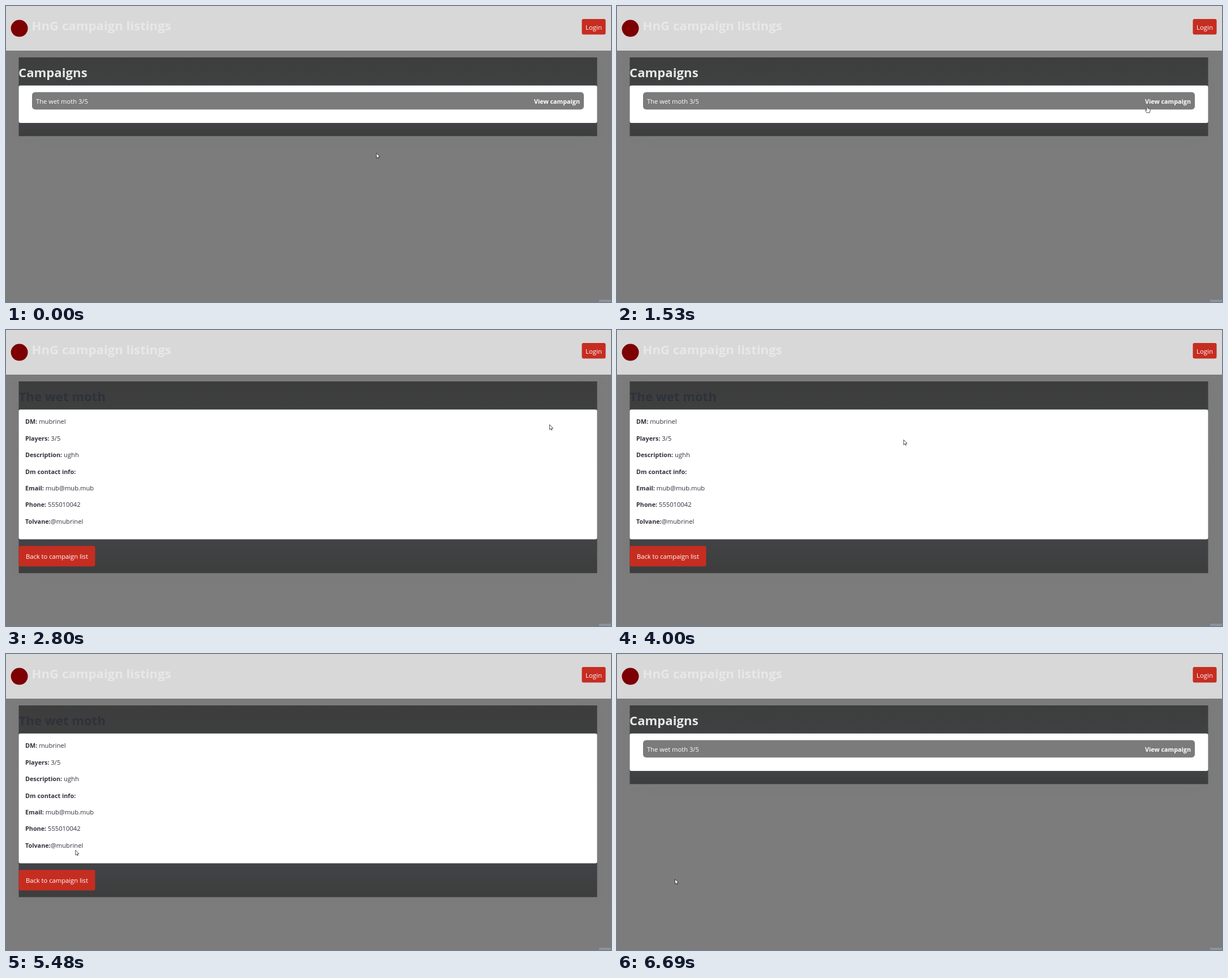
Animation, 1069 px wide and 524 px high, one loop 7.28 s. Source, as an HTML page:

```html
<!DOCTYPE html>
<html lang="en">
<head>
<meta charset="utf-8">
<title>Campaign listings</title>
<style>
  html, body { margin: 0; width: 100%; height: 100%; overflow: hidden; background: #7c7c7c; }
  svg { display: block; width: 1069px; height: 524px; }
  text { font: 11.2px "Open Sans", "Noto Sans", sans-serif; fill: #fff; white-space: pre; }
  .bold { font-weight: 700; font-size: 10.8px; }
  .heading { font-weight: 700; font-size: 22.2px; fill: #e8e8e8; }
  .dark, .rows text { fill: #2f313c; }
  .panel { fill: url(#shade); }
  .glow { fill: #727478; opacity: .3; filter: url(#blur); }
  .red { fill: #c62d21; }
  .red.pressed { fill: #b0281e; stroke: #b0281e; }
  .cursor { fill: #fff; stroke: #222; stroke-width: .8; stroke-linejoin: round; }
</style>
</head>
<body>
<svg viewBox="0 0 1069 524">
  <defs>
    <linearGradient id="shade" x2="0" y2="1">
      <stop offset="0" stop-color="#3c3d3c"/>
      <stop offset=".65" stop-color="#434447"/>
      <stop offset=".83" stop-color="#424346"/>
      <stop offset="1" stop-color="#3c3d3c"/>
    </linearGradient>
    <filter id="blur" x="-20%" y="-50%" width="140%" height="200%">
      <feGaussianBlur stdDeviation="16"/>
    </filter>
  </defs>
  <rect width="1069" height="524" fill="#7c7c7c"/>

  <g id="list">
    <rect class="glow" x="22.5" y="91" width="1022" height="139"/>
    <rect class="panel" x="22.5" y="91" width="1022" height="139.3"/>
    <text class="heading" x="22" y="125.5">Campaigns</text>
    <rect x="22.5" y="140.7" width="1022" height="66.3" rx="3" fill="#fff"/>
    <rect x="46" y="152.4" width="975" height="30.8" rx="5.5" fill="#7b7b7b"/>
    <text x="53" y="172.7">The wet moth 3/5</text>
    <text class="bold" x="1014" y="172.7" text-anchor="end">View campaign</text>
  </g>

  <g id="detail">
    <rect class="glow" x="22.5" y="91" width="1022" height="339"/>
    <rect class="panel" x="22.5" y="91" width="1022" height="339.4"/>
    <text class="heading dark" x="22.5" y="125.5">The wet moth</text>
    <rect x="22.5" y="140.7" width="1022" height="229.8" rx="3" fill="#fff"/>
    <g class="rows" id="rows"></g>
    <rect class="red" id="back" x="22.5" y="382.2" width="135" height="36.3" rx="3"/>
    <text x="35" y="405.2">Back to campaign list</text>
  </g>

  <rect width="1069" height="79" fill="#d8d8d8"/>
  <circle cx="23.6" cy="39.6" r="15" fill="#7d0003"/>
  <text class="heading" x="45.5" y="43">HnG campaign listings</text>
  <rect class="red" x="1017.5" y="23" width="42" height="27.5" rx="3"/>
  <text x="1024" y="42" style="font-size:11.4px">Login</text>
  <rect x="1048" y="520" width="21" height="4" fill="#8b939e"/>

  <g class="cursor" id="cursor">
    <path id="arrow" d="M.5 .5V9.4L2.5 7.5 3.8 10.3 5.1 9.7 3.9 7H6.6Z"/>
    <path id="hand" d="M-.9 .9Q0-.5 .9 .9V4.4Q2-.2+3.7 2.5 4.4Q3.6 4 4 5Q5 4.7 5.2 5.8V8.4L4.2 11.6H-.9L-3.4 7.8Q-3.4 6.2-2 6.8L-.9 7.8Z"/>
  </g>
</svg>
<script>
const LOOP = 7280, STEP = 67, FIRST_STEP = 520;
const el = id => document.getElementById(id);
const show = (id, on) => { el(id).style.display = on ? "" : "none"; };

const details = [
  ["DM:", " mubrinel"],
  ["Players:", " 3/5"],
  ["Description:", " ughh"],
  ["Dm contact info:", ""],
  ["Email:", " mub@mub.mub"],
  ["Phone:", " 555010042"],
  ["Tolvane:", "@mubrinel"]
];
el("rows").innerHTML = details.map(([label, value], i) =>
  `<text x="34" y="${166.3 + 29.4 * i}"><tspan class="bold">${label}</tspan>${value}</text>`).join("");
el("hand").setAttribute("d",
  "M-1 1Q0-.4 1 1V4.2Q2 3.6 2.5 4.6Q3.6 4 4 5Q5 4.7 5.2 5.8V8.4L4.2 11.6H-.9L-3.4 7.8Q-3.4 6.2-2 6.8L-1 7.8Z");

// Each stop is time, x, y of the pointer's hot spot.
const toLink = [
  [453, 654, 260], [820, 766, 234], [1190, 867, 208], [1530, 937.5, 177], [1930, 960, 167]
];
const toButton = [
  [3403, 960, 167], [3600, 828, 184], [3800, 650, 198], [4000, 508.5, 194], [4130, 447, 187],
  [4300, 386, 187], [4870, 219, 249], [5480, 122, 347], [5610, 112, 369], [6010, 102, 398]
];

// Cubic Hermite curve through the stops, at rest at both ends.
function along(path, t) {
  const last = path.length - 1;
  if (t <= path[0][0]) return path[0].slice(1);
  if (t >= path[last][0]) return path[last].slice(1);
  const i = path.findIndex(stop => stop[0] > t) - 1;
  const a = path[i], b = path[i + 1], span = b[0] - a[0], u = (t - a[0]) / span;
  const slope = (k, axis) => k === 0 || k === last ? 0 :
    (path[k + 1][axis] - path[k - 1][axis]) / (path[k + 1][0] - path[k - 1][0]);
  return [1, 2].map(axis =>
    a[axis] * (1 + 2 * u) * (1 - u) ** 2 + b[axis] * u * u * (3 - 2 * u) +
    span * u * (1 - u) * (slope(i, axis) * (1 - u) - slope(i + 1, axis) * u));
}

function draw(t) {
  const stepped = FIRST_STEP + STEP * Math.floor((t - FIRST_STEP) / STEP + .2);
  const [x, y] = along(t < 2800 ? toLink : toButton, stepped);
  const onDetail = t >= 2800 && t < 6690;
  const overLink = x > 932 && y < 179 && t < 2720;
  const overButton = onDetail && y > 382 && t < 6620;
  const pointing = overLink || overButton;

  show("list", !onDetail);
  show("detail", onDetail);
  show("hand", pointing);
  show("arrow", !pointing);
  el("back").classList.toggle("pressed", t >= 6560);
  el("cursor").setAttribute("transform", `translate(${x} ${y})`);
}

const start = performance.now();
function tick() {
  draw((performance.now() - start) % LOOP);
  requestAnimationFrame(tick);
}
tick();
</script>
</body>
</html>
```
